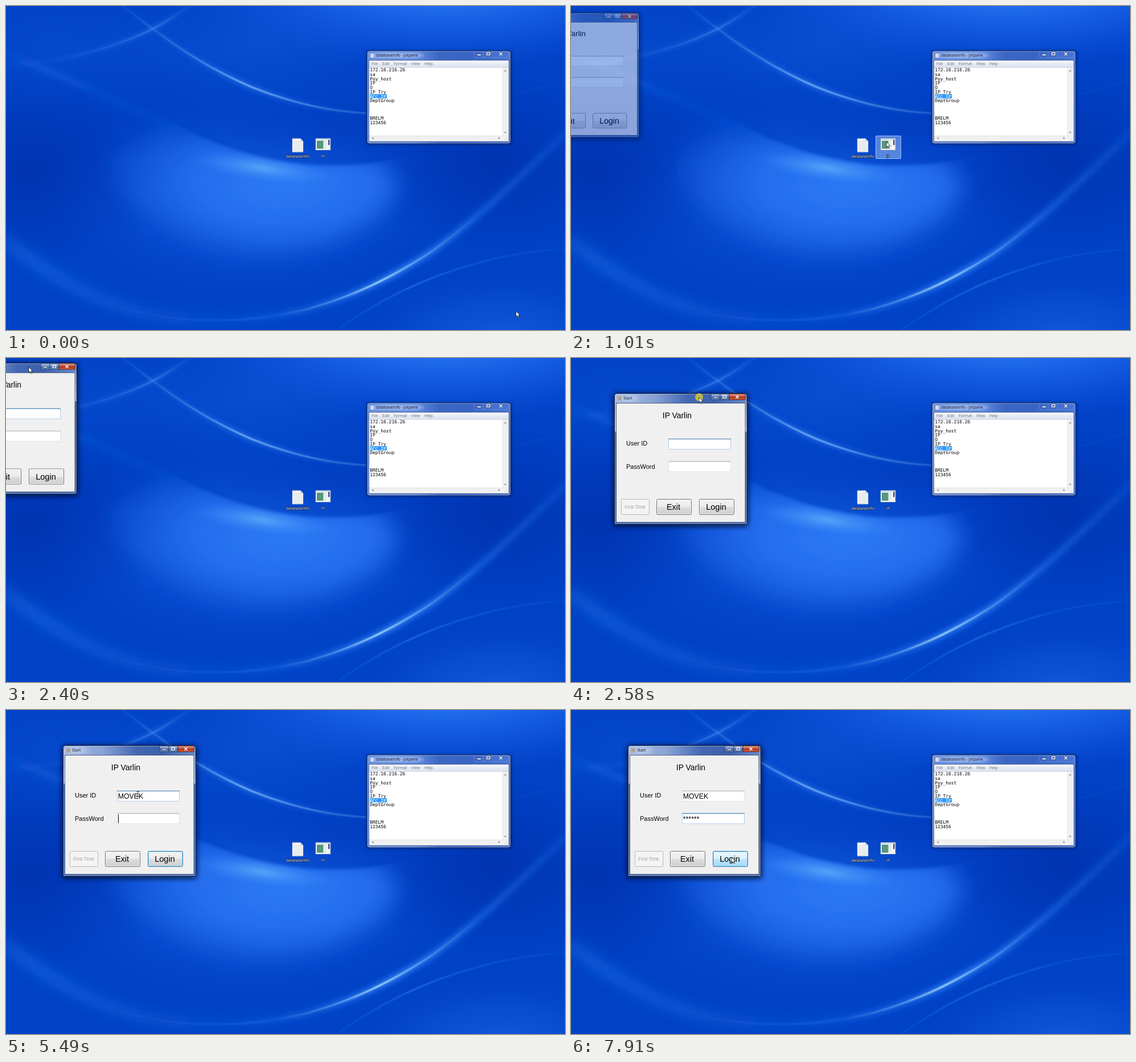
An HTML page for the animation above (8000 ms loop, 982 px wide and 570 px high).

```html
<!DOCTYPE html>
<html lang="en">
<head>
<meta charset="utf-8">
<title>Login demo</title>
<style>
html, body { margin: 0; width: 100%; height: 100%; overflow: hidden; background: #0042c6; }
svg { display: block; width: 100%; height: 100%; }
text { white-space: pre; }
.ui { font-family: "Open Sans", "Noto Sans", sans-serif; font-size: 7px; }
.mono { font-family: "DejaVu Sans Mono", monospace; font-size: 7.92px; }
.form { font-family: "Liberation Sans", Arial, sans-serif; }
.label { fill: #fff; font-size: 6.6px; text-anchor: middle; paint-order: stroke; stroke: #06205c; stroke-width: 1.4px; stroke-linejoin: round; }
.mid { text-anchor: middle; }
</style>
</head>
<body>
<svg viewBox="0 0 982 570" preserveAspectRatio="none">
<defs>
  <filter id="b1" x="-10%" y="-30%" width="120%" height="160%"><feGaussianBlur stdDeviation="0.8"/></filter>
  <filter id="b2" x="-10%" y="-10%" width="120%" height="120%"><feGaussianBlur stdDeviation="2.5"/></filter>
  <filter id="b4" x="-10%" y="-30%" width="120%" height="160%"><feGaussianBlur stdDeviation="4"/></filter>
  <filter id="b10" x="-20%" y="-30%" width="140%" height="160%"><feGaussianBlur stdDeviation="10"/></filter>
  <filter id="b18" x="-20%" y="-30%" width="140%" height="160%"><feGaussianBlur stdDeviation="18"/></filter>
  <radialGradient id="dark"><stop offset="0" stop-color="#0030ac" stop-opacity=".8"/><stop offset="1" stop-color="#0030ac" stop-opacity="0"/></radialGradient>
  <radialGradient id="glow"><stop offset="0" stop-color="#2a78f6"/><stop offset=".5" stop-color="#1e68ec" stop-opacity=".6"/><stop offset="1" stop-color="#0a4cd8" stop-opacity="0"/></radialGradient>
  <radialGradient id="shine"><stop offset="0" stop-color="#5cb0fa"/><stop offset=".4" stop-color="#4a98f8" stop-opacity=".7"/><stop offset="1" stop-color="#3a86f8" stop-opacity="0"/></radialGradient>
  <radialGradient id="blob" gradientUnits="userSpaceOnUse" cx="0" cy="0" r="1" gradientTransform="translate(490 310) scale(330 160)"><stop offset="0" stop-color="#2e7cf8" stop-opacity=".95"/><stop offset=".5" stop-color="#2a74f4" stop-opacity=".8"/><stop offset="1" stop-color="#1a60e6" stop-opacity=".2"/></radialGradient>
  <linearGradient id="btn" x2="0" y2="1"><stop offset="0" stop-color="#f3f3f3"/><stop offset=".5" stop-color="#ebebeb"/><stop offset=".5" stop-color="#dddddd"/><stop offset="1" stop-color="#cfcfcf"/></linearGradient>
  <linearGradient id="hot" x2="0" y2="1"><stop offset="0" stop-color="#eaf6fd"/><stop offset=".5" stop-color="#d9f0fc"/><stop offset=".5" stop-color="#bee6fd"/><stop offset="1" stop-color="#a7d9f5"/></linearGradient>
  <linearGradient id="red" x2="0" y2="1"><stop offset="0" stop-color="#dc9a8c"/><stop offset=".45" stop-color="#c8604c"/><stop offset=".5" stop-color="#b03018"/><stop offset="1" stop-color="#d0603c"/></linearGradient>
  <linearGradient id="cap" x2="0" y2="1"><stop offset="0" stop-color="#a4b6da"/><stop offset=".5" stop-color="#7690c4"/><stop offset=".5" stop-color="#46659f"/><stop offset="1" stop-color="#6a88bc"/></linearGradient>
  <linearGradient id="glass"><stop offset="0" stop-color="#a4b9e0"/><stop offset=".3" stop-color="#88a2d6"/><stop offset=".55" stop-color="#4468b2"/><stop offset=".75" stop-color="#3c61ae"/><stop offset="1" stop-color="#6c8cca"/></linearGradient>
  <linearGradient id="side" x2="0" y2="1"><stop offset="0" stop-color="#c4d2ec" stop-opacity=".3"/><stop offset=".24" stop-color="#d4e0f4" stop-opacity=".75"/><stop offset=".245" stop-color="#24488e" stop-opacity=".85"/><stop offset="1" stop-color="#3a62b4" stop-opacity=".8"/></linearGradient>
  <linearGradient id="glass2"><stop offset="0" stop-color="#6a90e0"/><stop offset=".35" stop-color="#6088dc"/><stop offset=".5" stop-color="#3c66c4"/><stop offset=".7" stop-color="#3a64c4"/><stop offset="1" stop-color="#4a76d4"/></linearGradient>
  <linearGradient id="menu" x2="0" y2="1"><stop offset="0" stop-color="#fbfcfe"/><stop offset=".5" stop-color="#e6eaf4"/><stop offset="1" stop-color="#dbe1f0"/></linearGradient>
  <clipPath id="below"><path d="M0,60 C110,105 220,170 340,230 C430,267 500,279 570,281 C690,281 830,245 982,180 V570 H0Z"/></clipPath>
</defs>
<g id="wall"></g>
<g id="desk"></g>
<g id="note"></g>
<g id="dlg"></g>
<g id="mouse">
  <circle id="press" r="7" fill="#d8d028" opacity=".8"/>
  <path id="arrow" d="M0,0V9.600L2.200,7.600L3.900,11.400L5.400,10.700L3.800,7.100H6.800Z" fill="#fff" stroke="#000" stroke-width=".7"/>
  <path id="beam" d="M-2.500,-4.700H-.6L0,-4.200L.6,-4.700H2.500M0,-4.200V4.200M-2.500,4.700H-.6L0,4.200L.6,4.700H2.500" fill="none" stroke="#222" stroke-width=".9"/>
</g>
</svg>
<script>
const $ = id => document.getElementById(id);
const rect = (x, y, w, h, fill, more = '') => `<rect x="${x}" y="${y}" width="${w}" height="${h}" fill="${fill}" ${more}/>`;
const text = (x, y, s, cls, more = '') => `<text x="${x}" y="${y}" class="${cls}" ${more}>${s}</text>`;
const line = (d, color, w, more = '') => `<path d="${d}" fill="none" stroke="${color}" stroke-width="${w}" ${more}/>`;
const oval = (x, y, rx, ry, fill, more = '') => `<ellipse cx="${x}" cy="${y}" rx="${rx}" ry="${ry}" fill="${fill}" ${more}/>`;

// A ray of light that is brightest around x = mid.
let rays = 0;
function ray(d, from, mid, to, color, w, blur, peak, ends = 0) {
  const id = 'ray' + rays++;
  const stop = (o, a) => `<stop offset="${o}" stop-color="${color}" stop-opacity="${a}"/>`;
  const m = (mid - from) / (to - from);
  return `<linearGradient id="${id}" gradientUnits="userSpaceOnUse" x1="${from}" y1="0" x2="${to}" y2="0">` +
    stop(0, ends) + stop(m * 0.6, ends + (peak - ends) * 0.45) + stop(m, peak) +
    stop(m + (1 - m) * 0.45, ends + (peak - ends) * 0.4) + stop(1, ends) +
    `</linearGradient>` + line(d, `url(#${id})`, w, `filter="url(#${blur})"`);
}

function drawWall() {
  const up = 'M335,-8 C300,15 280,29 258,40 C200,70 110,97 -5,106';
  const down = 'M195,-8 C215,8 238,26 258,40 C310,80 370,116 430,142 C500,170 570,187 645,189 C740,190 840,175 990,128';
  const mid = 'M-5,83 C110,125 220,182 340,235 C430,270 500,280 570,281 C690,281 830,245 982,180';
  const big = 'M-5,411 C70,468 150,520 250,542 C330,558 430,558 530,533 C600,513 660,488 740,437 C830,375 900,303 990,217';
  const low = 'M572,576 C650,520 730,478 840,449 C890,436 940,429 990,427';
  $('wall').innerHTML =
    rect(0, 0, 982, 570, '#0042c6') +
    oval(40, 290, 260, 170, 'url(#dark)') +
    oval(860, 275, 250, 160, 'url(#dark)') +
    oval(600, 215, 230, 60, 'url(#dark)', 'opacity=".4"') +
    oval(770, -30, 480, 150, 'url(#glow)') +
    oval(760, -25, 330, 80, 'url(#glow)', 'opacity=".7"') +
    oval(430, 70, 320, 130, 'url(#glow)', 'opacity=".2"') +
    oval(90, 70, 260, 130, 'url(#glow)', 'opacity=".12"') +
    oval(430, 340, 370, 190, 'url(#glow)', 'opacity=".4"') +
    oval(870, 590, 270, 130, 'url(#glow)', 'opacity=".45"') +
    `<g filter="url(#b2)"><g clip-path="url(#below)">
      <path d="M185,275 C200,235 270,215 340,225 C420,240 480,260 570,262 C620,262 650,268 670,282 C698,305 690,335 660,365 C600,420 500,440 420,435 C300,415 180,345 185,275Z" fill="url(#blob)" filter="url(#b18)"/>
      ${oval(450, 285, 125, 24, 'url(#shine)', 'opacity=".85" transform="rotate(8 450 285)"')}
    </g></g>` +
    ray(up, 0, 262, 340, '#3c8cf4', 5, 'b4', 0.5, 0.1) +
    ray(up, 90, 262, 340, '#64acfc', 1.6, 'b1', 0.65) +
    ray(down, 195, 415, 640, '#2c7cf4', 8, 'b4', 0.7) +
    ray(down, 195, 415, 800, '#9cd2ff', 2, 'b1', 1, 0.05) +
    ray(mid, -100, 60, 420, '#1668e0', 14, 'b4', 0.35) +
    ray(mid, 350, 600, 860, '#1c62e4', 2, 'b1', 0.35) +
    ray(big, -140, 40, 520, '#1668e2', 24, 'b10', 0.6, 0.1) +
    ray(big, 120, 400, 640, '#2c7cf0', 3, 'b1', 0.4) +
    ray(big, 380, 680, 1060, '#2c7cf4', 12, 'b4', 0.9) +
    ray(big, 480, 655, 830, '#b4e2ff', 2.8, 'b1', 1) +
    ray(low, 550, 715, 990, '#3c8cf4', 2, 'b1', 0.65, 0.1);
}

function drawDesk() {
  let lines = '';
  for (let y = 238; y < 256; y += 2.5) lines += line(`M505,${y}H520`, '#c4ccd4', 0.6);
  $('desk').innerHTML =
    rect(535.5, 228.5, 44, 40, '#a4c4fa', 'id="pick" rx="1.500" fill-opacity=".5" stroke="#b8d2fc" stroke-opacity=".8"') +
    `<path d="M503,233H517L522,238V257H503Z" fill="#f4f6f8" stroke="#a8b4c0" stroke-width=".6"/><path d="M517,233V238H522Z" fill="#ccd4dc"/>` +
    line('M504,233.500H516', '#9aa4b0', 1.2, 'stroke-dasharray="1 1"') + lines +
    text(512.5, 266.5, 'databaseInfo', 'ui label') +
    rect(544, 233, 26, 20.5, '#f2f4f6', 'stroke="#8a98a8" stroke-width=".7"') +
    rect(544.5, 233.5, 25, 2, '#c8d4e2') +
    rect(546, 237, 11.5, 14, '#54987c') +
    rect(558.5, 237, 5, 14, '#e4eaf0') +
    rect(566, 235.5, 2.5, 9, '#34567c') +
    text(557, 266.5, 'IP', 'ui label');
}

function drawNote() {
  const body = ['172.16.216.26', 'sa', 'Poy_host', 'IP', 'O', 'IP_Try', 'ACC_IP', 'DeptGroup', '', '', '', 'BRELM', '123456'];
  const menu = { File: 642, Edit: 661, Format: 681, View: 712, Help: 735 };
  $('note').innerHTML =
    rect(634, 79, 254, 164, '#001440', 'rx="4" opacity=".6" filter="url(#b2)"') +
    rect(634.2, 78.8, 252.5, 163.4, 'url(#glass2)', 'rx="4" stroke="#0e1e48"') +
    rect(635.4, 80, 250.2, 161, 'none', 'rx="3" stroke="#c4d6f8" stroke-opacity=".55" stroke-width=".8"') +
    oval(688, 87, 46, 5, '#c4d6f6', 'opacity=".6" filter="url(#b2)"') +
    rect(640, 83.5, 6.5, 7.5, '#e8f0f8', 'stroke="#7088a8" stroke-width=".6"') +
    line('M641.500,86H645.500M641.500,88.500H645.500', '#7aa0c4', 0.7) +
    text(650, 89.2, 'databaseInfo - Jotpane', 'ui', 'fill="#0c1428"') +
    line('M822.500,80V88.500Q822.500,90.500 825,90.500H881Q883,90.500 883,88.500V80M838.500,80V90M854.500,80V90', '#a0bcf0', 0.6, 'opacity=".45"') +
    rect(827.5, 84.8, 7, 2.4, '#fff', 'stroke="#2a4278" stroke-width=".7"') +
    rect(844.5, 82, 5.5, 4, 'none', 'stroke="#2a4278" stroke-width="2.600"') +
    rect(844.5, 82, 5.5, 4, 'none', 'stroke="#fff" stroke-width="1.400"') +
    line('M866.800,81.800L871.700,86.700M871.700,81.800L866.800,86.700', '#2a4278', 2.6) +
    line('M866.800,81.800L871.700,86.700M871.700,81.800L866.800,86.700', '#fff', 1.4) +
    rect(637.5, 95.5, 246, 143, '#f0f0f0', 'stroke="#3c5690" stroke-width=".8"') +
    rect(638, 96, 245, 12, 'url(#menu)') +
    Object.entries(menu).map(([s, x]) => text(x, 104.2, s, 'ui', 'fill="#6c6c70"')).join('') +
    rect(638, 108, 234, 120, '#fff') +
    line('M638,108.300H883', '#c8ccd6', 0.7) +
    line('M872.500,108V228M638,228.500H872', '#dcdcdc', 0.7) +
    rect(639.5, 155, 29.5, 7.6, '#3399ff') +
    body.map((s, i) => text(639.3, 115.3 + i * 7.7, s, 'mono', `fill="${i == 6 ? '#fff' : '#000'}"`)).join('') +
    `<path d="M875,115L877,112.500L879,115ZM875,221.500L877,224L879,221.500ZM645.500,230.300L643,232.500L645.500,234.700ZM865,230.300L867.500,232.500L865,234.700Z" fill="#808080"/>` +
    line('M876,237L881,232M879,237L881,235', '#b4b4b4', 0.8, 'stroke-dasharray="1 1"');
}

const button = (x, w, id) => rect(x + 0.5, 248.5, w, 27, 'url(#btn)', `id="${id}" rx="2" stroke="#707070"`) +
  rect(x + 1.5, 249.5, w - 2, 25, 'none', `id="${id}In" rx="1.500" stroke="#fcfcfc" stroke-opacity=".8"`);
const field = (y, id) => rect(195.5, y, 109, 18, '#fff', `id="${id}" stroke="#e2e3ea"`) +
  line(`M195,${y}H305`, '#abadb3', 1, `id="${id}Top"`);

function drawDialog() {
  $('dlg').innerHTML =
    rect(98, 62, 238, 235, '#000a28', 'rx="6" opacity=".75" filter="url(#b4)"') +
    rect(100.5, 62.5, 232.5, 230, 'url(#glass)', 'rx="4" stroke="#0c1630"') +
    rect(101, 78, 3, 212, 'url(#side)') + rect(330, 78, 2.6, 212, 'url(#side)') +
    rect(101, 289, 231.5, 3, '#4468b4') +
    rect(101.5, 63.5, 230.5, 228, 'none', 'rx="3" stroke="#d4e0f6" stroke-opacity=".65" stroke-width=".8"') +
    oval(124, 71, 20, 5, '#dce6f6', 'opacity=".6" filter="url(#b4)"') +
    rect(106, 67.5, 7, 7, '#b4a08c') +
    text(116, 73.4, 'Start', 'ui', 'fill="#0a1020"') +
    rect(270, 63, 16, 10.5, 'url(#cap)', 'stroke="#1e3260" stroke-width=".7"') +
    rect(286, 63, 16, 10.5, 'url(#cap)', 'stroke="#1e3260" stroke-width=".7"') +
    rect(302, 63, 28, 10.5, 'url(#red)', 'stroke="#48180c" stroke-width=".7"') +
    rect(274.5, 68.8, 7, 2, '#fff', 'stroke="#33466c" stroke-width=".6"') +
    rect(291, 66.3, 5.5, 4, 'none', 'stroke="#fff" stroke-width="1.200"') +
    line('M313.500,66L318.500,71M318.500,66L313.500,71', '#fff', 1.4) +
    rect(103.5, 79.5, 226.5, 209.5, '#f0f0f0', 'stroke="#33466c" stroke-width=".8"') +
    text(184.8, 105.8, 'IP Varlin', 'form', 'font-size="13.900"') +
    text(121, 153.6, 'User ID', 'form', 'font-size="11"') +
    text(121, 195.4, 'PassWord', 'form', 'font-size="11"') +
    field(142.5, 'user') + field(182, 'pass') +
    text(196.8, 156.2, '', 'form', 'id="userText" font-size="12.300"') +
    text(196.8, 196.2, '', 'form', 'id="passText" font-size="12.300"') +
    rect(197, 144, 1, 15, '#000', 'id="caret"') +
    rect(112.5, 248.5, 49, 27, '#f4f4f4', 'rx="2" stroke="#adb2b5" stroke-width=".9"') +
    text(136.5, 265.2, 'First Time', 'form mid', 'font-size="8.300" fill="#a6a296"') +
    button(174, 61, 'exit') + button(249, 61, 'login') +
    text(204, 267.2, 'Exit', 'form mid', 'font-size="14.400"') +
    text(279, 267.2, 'Login', 'form mid', 'font-size="14.600"');
}

const LOOP = 8000;
// The picture only changes at these moments.
const ticks = [0, 170, 340, 510, 680, 850, 1010, 1200, 1380, 1550, 1720, 1880, 2050, 2230, 2400, 2580, 2750, 2920, 3090,
  3260, 3610, 4130, 4310, 4620, 4800, 4970, 5490, 5670, 5850, 6180, 6350, 6530, 6700, 7220, 7390, 7560, 7730, 7910];
// time, x, y
const path = [[0, 896, 537], [680, 556, 243], [850, 554, 239], [1010, 554, 239], [1200, 441, 235], [1550, 190, 105],
  [1880, 95, 47], [2050, 86, 40], [2400, 40, 16], [2580, 225, 69], [2750, 249, 69], [3090, 236, 138],
  [3260, 232, 148], [7220, 232, 150], [7730, 282, 258], [7910, 282, 259]];

function pointer(t) {
  let i = path.length - 1;
  while (path[i][0] > t) i--;
  const a = path[i], b = path[i + 1] || a;
  // The hand rests on the field while the keys are used.
  if (a[0] == 3260) return [a[1], a[2]];
  let k = b === a ? 0 : (t - a[0]) / (b[0] - a[0]);
  if (i == 0) k = k * k * (3 - 2 * k);
  return [a[1] + (b[1] - a[1]) * k, a[2] + (b[2] - a[2]) * k];
}

const within = (t, a, b) => t >= a && t < b;
const show = (id, on) => $(id).setAttribute('visibility', on ? 'visible' : 'hidden');
const paint = (id, color) => $(id).setAttribute('stroke', color);

function focus(id, on) {
  paint(id, on ? '#b5cfe7' : '#e2e3ea');
  paint(id + 'Top', on ? '#3d7bad' : '#abadb3');
}

function render(ms) {
  const t = ticks.filter(x => x <= ms).pop();
  const typed = [4310, 4620, 4800, 4800, 4970].filter(x => x <= t).length;
  const stars = [5850, 6180, 6350, 6350, 6530, 6700].filter(x => x <= t).length;

  show('pick', within(t, 680, 1200));
  show('dlg', t >= 1010);
  const [dx, dy] = t < 2580 ? [-209, -53.5] : t < 2750 ? [-24, 0] : [0, 0];
  const opening = t < 1200;
  $('dlg').setAttribute('opacity', opening ? 0.58 : 1);
  $('dlg').setAttribute('transform', opening
    ? 'translate(7 121.500) scale(.965 .95) translate(-216.500 -177.500)'
    : `translate(${dx} ${dy})`);

  $('userText').textContent = 'MOVEK'.slice(0, typed);
  $('passText').textContent = '*'.repeat(stars);
  focus('user', within(t, 1200, 6180));
  focus('pass', t >= 5670);

  const inPass = t >= 5490;
  const entry = $(inPass ? 'passText' : 'userText');
  const len = entry.textContent ? entry.getComputedTextLength() : 0;
  $('caret').setAttribute('x', 197 + Math.round(len));
  $('caret').setAttribute('y', inPass ? 184 : 144);
  show('caret', within(t, 3090, 3610) || within(t, 4130, 7220));

  const hot = t >= 7560;
  $('login').setAttribute('fill', hot ? 'url(#hot)' : 'url(#btn)');
  paint('login', inPass ? '#3c7fb1' : '#707070');
  paint('loginIn', inPass ? '#7cd4f6' : '#fcfcfc');

  const [x, y] = pointer(t);
  const typing = within(t, 4310, 5490) || within(t, 6180, 7220);
  const beam = within(t, 3090, 7390);
  $('mouse').setAttribute('transform', `translate(${x.toFixed(1)} ${y.toFixed(1)})`);
  show('arrow', !beam);
  show('beam', beam && !typing);
  show('press', within(t, 2580, 2920));
}

drawWall();
drawDesk();
drawNote();
drawDialog();
const start = performance.now();
function frame() {
  render((performance.now() - start) % LOOP);
  requestAnimationFrame(frame);
}
frame();
</script>
</body>
</html>
```
